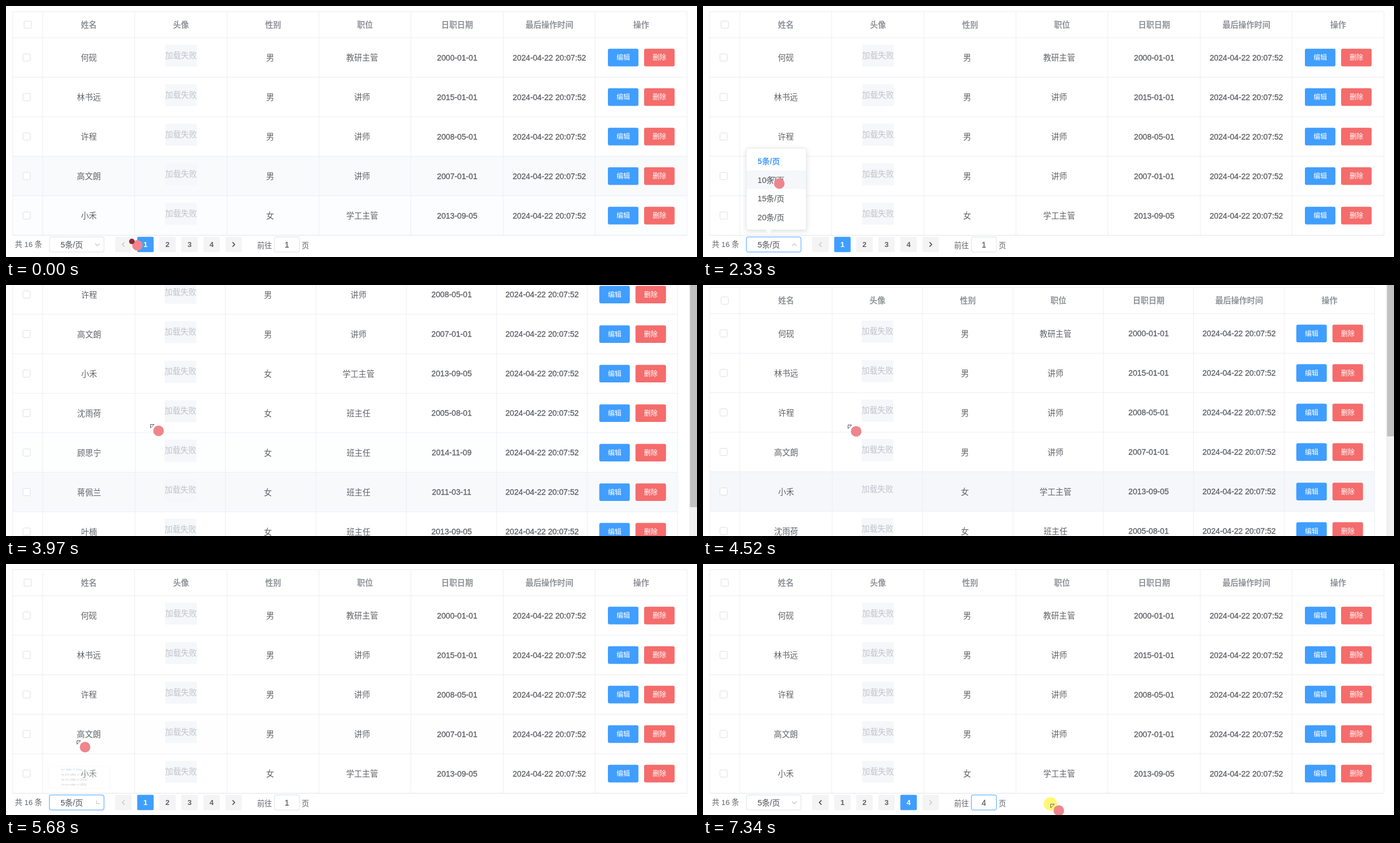
Recreate the animation shown at these times as an HTML page. Size 1241x451 px, loop 7.4 s.

```html
<!DOCTYPE html>
<html lang="zh-CN">
<head>
<meta charset="utf-8">
<title>员工列表</title>
<style>
html, body { margin: 0; width: 100%; height: 100%; overflow: hidden; background: #fff; }
svg { display: block; }
text { font: 300 14.3px "Liberation Sans", "Noto Sans CJK SC", "Noto Sans CJK", "Noto Sans CJK JP", sans-serif; fill: #606266; text-anchor: middle; }
.head { font-weight: 700; fill: #909399; }
.num { font-size: 14.2px; stroke: #606266; stroke-width: .35px; }
.fail { fill: #c0c4cc; }
.btn { font-size: 12.2px; font-weight: 400; fill: #fff; }
.small { font-size: 13.3px; text-anchor: start; }
.page { font-size: 13.3px; font-weight: 700; }
.item { font-size: 14.2px; text-anchor: start; stroke: #606266; stroke-width: .2px; }
.on { font-weight: 700; fill: #409eff; stroke: none; }
</style>
</head>
<body>
<svg width="1241" height="451" viewBox="0 0 1241 451">
  <defs>
    <filter id="shade" x="-20%" y="-20%" width="140%" height="140%">
      <feDropShadow dx="0" dy="2" stdDeviation="5" flood-color="#000" flood-opacity=".12"/>
    </filter>
  </defs>
  <g id="table"></g>
  <g id="pager"></g>
  <g id="popup"></g>
  <g id="bar">
    <rect x="1227" y="0" width="14" height="451" fill="#f1f1f1"/>
    <rect id="thumb" x="1228.5" y="0" width="12.5" height="272" fill="#c1c1c1"/>
  </g>
  <circle id="click" r="12" fill="#fff000" fill-opacity=".55"/>
  <g id="cursor">
    <path id="tip" d="M.5 .5H7L.5 7Z" fill="#fff" stroke="#55525c"/>
    <circle id="head" cx="15" cy="12" r="9.5"/>
    <circle id="ban" cx="5" cy="5" r="5" fill="#8d2b3a"/>
  </g>
</svg>
<script>
const LOOP = 7400, ROW = 71, TOP = 57, BLUE = '#409eff', EDGE = '#dcdfe6';
const $ = id => document.getElementById(id);

const people = `何砚|男|教研主管|2000-01-01
林书远|男|讲师|2015-01-01
许程|男|讲师|2008-05-01
高文朗|男|讲师|2007-01-01
小禾|女|学工主管|2013-09-05
沈雨荷|女|班主任|2005-08-01
顾思宁|女|班主任|2014-11-09
蒋佩兰|女|班主任|2011-03-11
叶楠|女|班主任|2013-09-05
罗建川|男||2007-02-01
邓海生|男||2008-08-18
曹立群|男||2012-11-01
韩振国|男|讲师|2002-08-01
陆星河|男|讲师|2011-05-01
唐景明|男|讲师|2010-01-01
魏长青|男||2015-03-21`.split('\n').map(s => s.split('|'));
const titles = ['姓名', '头像', '性别', '职位', '日职日期', '最后操作时间', '操作'];
const wideCols = [12, 66, 231, 397, 562, 727, 893, 1058, 1223];
const tightCols = [12, 66, 232, 394, 557, 719, 881, 1044, 1206];

// Timeline: [ms, values...]
const views = [[0, 0, 5], [480, 5, 5], [860, 10, 5], [1230, 15, 1], [1620, 0, 5], [2600, 0, 10], [5650, 0, 5]];
const pages = [[0, 1], [430, 2], [810, 3], [1200, 4], [1590, 1], [7265, 4]];
const inputs = [[0, null], [6580, ''], [6790, '4']];
const scrolls = [[0, 0], [2850, 0], [3130, 236], [3550, 236], [3590, 305], [3690, 320.5], [3880, 320.5],
  [3980, 215], [4090, 110], [4500, 110], [4519, 5.5], [4580, 5.5], [4620, 0], [4660, 0], [4860, 320.5],
  [5649, 320.5], [5650, 0]];
const moves = [[-250, 300, 275], [-100, 250, 341], [0, 221, 418], [280, 289, 427], [430, 290, 428], [640, 329, 428],
  [830, 330, 428], [1060, 371, 427], [1240, 371, 427], [1500, 251, 144], [1650, 250, 145], [1960, 128, 428],
  [2080, 128, 427], [2310, 122, 307], [2600, 122, 307], [3130, 250, 258], [3280, 250, 258], [3350, 259, 250],
  [4100, 259, 250], [4500, 260, 251], [4960, 260, 251], [5090, 130, 463], [5150, 130, 463], [5360, 127, 317],
  [5690, 127, 317], [6230, 504, 430], [6500, 506, 430], [7150, 624, 431], [7400, 624, 431]];
const clicks = [390, 770, 1110, 1545, 2000, 2430, 5090, 5410, 6260, 7265];
const opens = [[2040, 2590], [5130, 5450]];

const clamp = v => Math.max(0, Math.min(1, v));
const step = (list, t) => list.reduce((a, b) => b[0] <= t ? b : a);

function tween(list, t) {
  let i = 0;
  while (i < list.length - 2 && list[i + 1][0] <= t) i++;
  const a = list[i], b = list[i + 1];
  let p = clamp((t - a[0]) / (b[0] - a[0]));
  p = p * p * (3 - 2 * p);
  return a.slice(1).map((v, k) => v + (b[k + 1] - v) * p);
}

const rect = (x, y, w, h, fill, more = '') =>
  `<rect x="${x}" y="${y}" width="${w}" height="${h}" fill="${fill}" ${more}/>`;
const text = (x, y, s, cls = '', more = '') => `<text x="${x}" y="${y}" class="${cls}" ${more}>${s}</text>`;
const frame = (x, y, w, h, stroke, r) => rect(x, y, w, h, '#fff', `rx="${r}" stroke="${stroke}"`);
const chevron = (x, y, dir, color) =>
  `<path d="M${x - 2 * dir} ${y - 4}l${4 * dir} 4l${-4 * dir} 4" fill="none" stroke="${color}" stroke-width="1.3"/>`;

function drawTable(start, n) {
  const cols = n > 5 ? tightCols : wideCols, left = cols[0], right = cols[8];
  const mid = i => (cols[i] + cols[i + 1]) / 2 + .3;
  const bottom = TOP + n * ROW;
  let s = '';
  for (let i = 0; i < n; i++)
    s += rect(left, TOP + i * ROW, right - left, ROW, '#f5f7fa', `id="row${i}" fill-opacity="0"`);
  cols.forEach(x => s += rect(x - .5, 10, 1, bottom - 10, '#ebeef5'));
  s += rect(left, 9.5, right - left, 1, '#ebeef5');
  for (let i = 0; i <= n; i++)
    s += rect(left, TOP + i * ROW - .5, right - left, 1, i < n ? '#ebeef5' : '#dfe3ec');
  s += frame(32.5, 27, 13, 13, EDGE, 2);
  titles.forEach((h, i) => s += text(mid(i + 1), 38.7, h, 'head'));
  for (let i = 0; i < n; i++) {
    const [name, sex, job, date] = people[start + i];
    const y = TOP + i * ROW, base = y + 41, ops = mid(7);
    s += frame(30.5, y + 29, 13, 13, EDGE, 2)
      + text(mid(1), base, name)
      + rect(mid(2) - 28.5, y + 12.5, 57, 39.5, '#f5f7fa')
      + text(mid(2), y + 36.8, '加载失败', 'fail')
      + text(mid(3) - 5.5, base, sex)
      + text(mid(4) - 5.2, base, job)
      + text(mid(5), base - .4, date, 'num')
      + text(mid(6), base - .4, '2024-04-22 20:07:52', 'num')
      + rect(ops - 59.8, y + 19.8, 54.8, 31.6, BLUE, 'rx="3"')
      + text(ops - 32.2, y + 40.3, '编辑', 'btn')
      + rect(ops + 5.2, y + 19.8, 54.8, 31.6, '#f56c6c', 'rx="3"')
      + text(ops + 32.6, y + 40.3, '删除', 'btn');
  }
  $('table').innerHTML = s;
}

function drawPager(size, cur, count, value, selFocus, inFocus, over) {
  let s = text(16, 433, '共 16 条', 'small')
    + frame(78, 415, 98, 27, selFocus ? BLUE : EDGE, 3)
    + text(98, 434, size + '条/页', 'item')
    + '<path id="arrow" d="M-4 -2l4 4l4 -4" fill="none" stroke="#c0c4cc" stroke-width="1.2"/>';
  for (let i = 0; i <= count + 1; i++) {
    const x = 196 + 39.6 * i, c = x + 14.8, on = i === cur;
    s += rect(x, 414.7, 29.6, 27.6, on ? BLUE : '#f4f4f5', 'rx="2"');
    if (i === 0 || i > count) {
      const off = i === 0 ? cur === 1 : cur === count;
      s += chevron(c, 428.5, i ? 1 : -1, off ? '#c0c4cc' : over === i ? BLUE : '#303133');
    } else {
      s += text(c, 433, i, 'page', `style="fill:${on ? '#fff' : over === i ? BLUE : '#606266'}"`);
    }
  }
  const dx = (count - 4) * 39.6;
  s += text(451 + dx, 434.5, '前往', 'small')
    + frame(482 + dx, 415, 45, 27, inFocus ? BLUE : EDGE, 3)
    + text(504.5 + dx, 434, value, 'num')
    + text(531 + dx, 434.5, '页', 'small');
  $('pager').innerHTML = s;
}

function drawPopup(size, over) {
  let s = '<g filter="url(#shade)">' + frame(78, 255.5, 107.5, 147, '#e4e7ed', 4) + '</g>'
    + '<path d="M112 402.5l6 6l6 -6Z" fill="#fff"/>';
  [5, 10, 15, 20].forEach((v, i) => {
    const y = 262 + i * 33.5;
    if (i === over) s += rect(78.5, y, 106.5, 33.5, '#f5f7fa');
    s += text(98, y + 22, v + '条/页', 'item' + (v === size ? ' on' : ''));
  });
  $('popup').innerHTML = s;
}

function model(t) {
  const [, start, n] = step(views, t);
  const [x, y] = tween(moves, t), [scroll] = tween(scrolls, t);
  const drop = (n > 1 ? n - 5 : -4) * ROW - scroll;
  const open = opens.some(([a, b]) => t >= a && t < b);
  const inPopup = open && x > 78 && x < 186 && y > 255 + drop && y < 403 + drop;
  const row = Math.floor((y + scroll - TOP) / ROW);
  return { start, n, x, y, scroll, drop, inPopup, row: !inPopup && row >= 0 && row < n ? row : -1 };
}

// Row tint follows the pointer over the last quarter second.
function tints(t) {
  const out = Array(10).fill(0), N = 50;
  for (let i = 0; i < N; i++) {
    const { row } = model(t - (i + .5) * 250 / N);
    if (row >= 0) out[row] += 1 / N;
  }
  return out;
}

const last = {};
function redraw(name, fn, ...args) {
  const key = args.join();
  if (last[name] === key) return;
  last[name] = key;
  fn(...args);
}

function render(t) {
  const m = model(t), { start, n, x, y, scroll, drop } = m;
  const size = n > 5 ? 10 : 5, count = n > 5 ? 2 : 4;
  const cur = step(pages, t)[1], typed = step(inputs, t)[1];

  redraw('table', drawTable, start, n);
  $('table').setAttribute('transform', `translate(0 ${-scroll})`);
  tints(t).slice(0, n).forEach((a, i) => $('row' + i).setAttribute('fill-opacity', a));

  const slot = (x - 196) / 39.6, py = y - drop;
  let over = Math.floor(slot);
  if (over < 0 || over > count + 1 || slot - over > .75 || py < 415 || py > 442) over = -1;
  redraw('pager', drawPager, size, cur, count, typed === null ? cur : typed,
    t >= 2040 && t < 6260, t >= 6260, over);
  $('pager').setAttribute('transform', `translate(0 ${drop})`);

  let p = 0;
  for (const [a, b] of opens) {
    const grow = clamp((t - a) / 230), shrink = clamp(1 - (t - b) / 315);
    p = Math.max(p, (1 - (1 - grow) ** 2) * shrink);
  }
  $('arrow').setAttribute('transform', `translate(164 429) rotate(${180 * p})`);
  redraw('popup', drawPopup, size, m.inPopup ? Math.floor((py - 262) / 33.5) : -1);
  $('popup').setAttribute('transform', `translate(0 ${drop + 403 * (1 - p)}) scale(1 ${p})`);
  $('popup').setAttribute('opacity', p);

  $('bar').style.display = n > 5 ? '' : 'none';
  $('thumb').setAttribute('height', 272 + .6 * (scroll - 5.5));

  const banned = over === 0 && cur === 1 || over === count + 1 && cur === count;
  $('cursor').setAttribute('transform', `translate(${x} ${y})`);
  $('tip').style.display = banned ? 'none' : '';
  $('ban').style.display = banned ? '' : 'none';
  $('head').setAttribute('fill', over >= 0 && !banned ? '#e9b195' : '#ef858c');
  $('click').style.display = clicks.some(c => t >= c && t < c + 140) ? '' : 'none';
  $('click').setAttribute('cx', x);
  $('click').setAttribute('cy', y);
}

const begin = performance.now();
function tick() {
  render((performance.now() - begin) % LOOP);
  requestAnimationFrame(tick);
}
tick();
</script>
</body>
</html>
```
